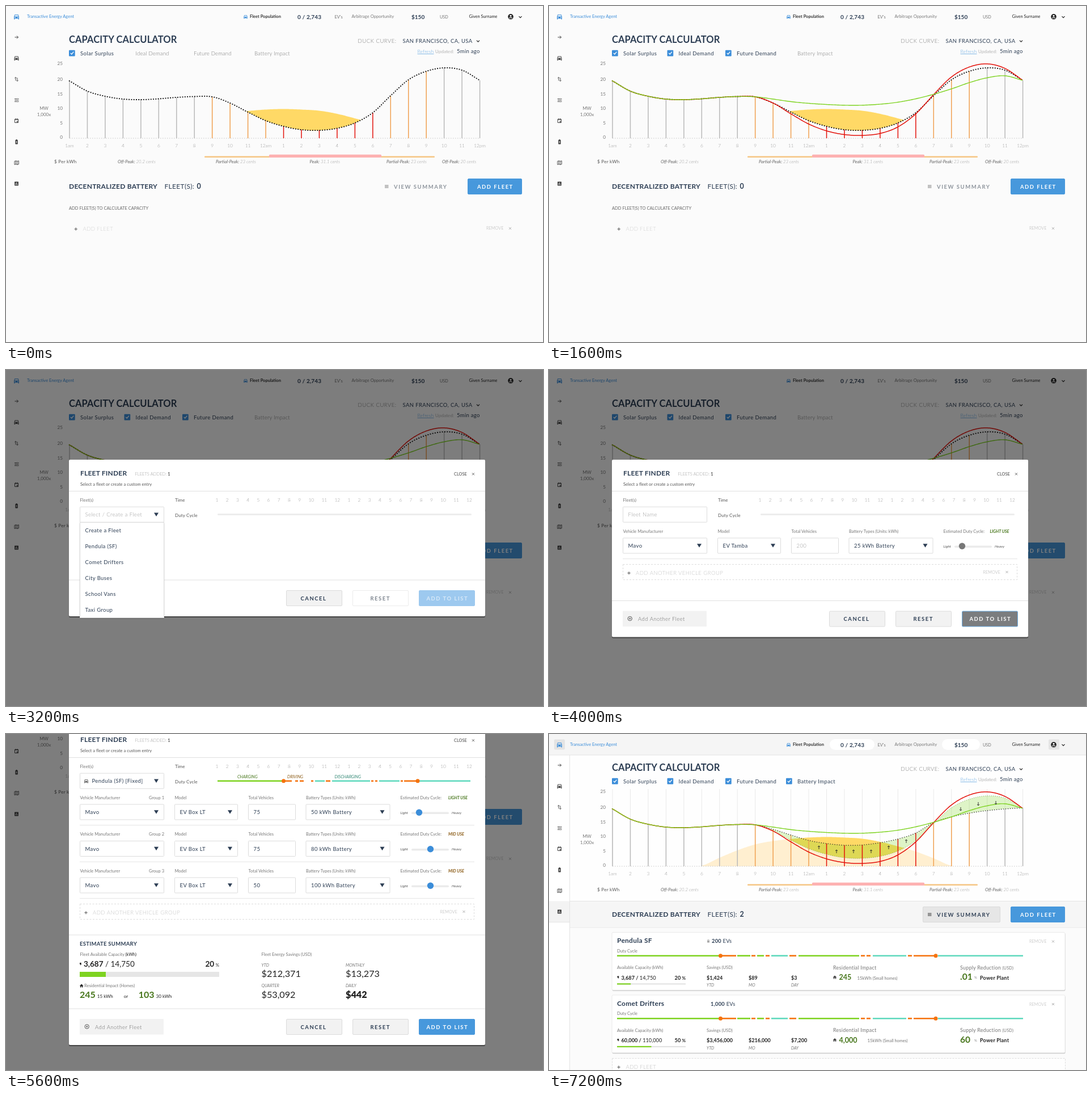
An HTML page for the animation above (8000 ms loop, 947 px wide and 592 px high).

```html
<!DOCTYPE html>
<html lang="en">
<head>
<meta charset="utf-8">
<title>Capacity calculator</title>
<style>
html, body { margin: 0; width: 100%; height: 100%; overflow: hidden; background: #fbfbfb; }
svg { display: block; font-family: Lato, sans-serif; }
text { white-space: pre; }
.l { font-weight: 300; }
.b { font-weight: 700; }
.k { font-weight: 900; }
.i { font-style: italic; }
.m { text-anchor: middle; }
.e { text-anchor: end; }
</style>
</head>
<body>
<svg id="stage" width="947" height="592" viewBox="0 0 947 592"></svg>
<script>
const DARK = '#2d3e54', INK = '#222', GRAY = '#777', PALE = '#a8a8a8', FAINT = '#cfcfcf';
const BLUE = '#4798dc', CHECK = '#3b8dd9', GREEN = '#7ed321', ORANGE = '#f5730f', TEAL = '#5fd9bd';
const RED = '#e3120b', LEAF = '#46751a';
const FRAME = 800, COUNT = 10;

// Drawing helpers, each returns SVG markup
const text = (x, y, s, size = 7.5, fill = GRAY, cls = '', gap = 0) =>
  `<text x="${x}" y="${y}" font-size="${size}" fill="${fill}" class="${cls}" letter-spacing="${gap}">${s}</text>`;
const span = (s, attrs) => `<tspan ${attrs}>${s}</tspan>`;
const rect = (x, y, w, h, fill, more = '') =>
  `<rect x="${x}" y="${y}" width="${w}" height="${h}" fill="${fill}" ${more}/>`;
const line = (x1, y1, x2, y2, stroke, w = 1, more = '') =>
  `<path d="M${x1} ${y1}L${x2} ${y2}" stroke="${stroke}" stroke-width="${w}" ${more}/>`;
const path = (d, stroke, w = 1, more = '') =>
  `<path d="${d}" fill="none" stroke="${stroke}" stroke-width="${w}" ${more}/>`;
const dot = (x, y, r, fill) => `<circle cx="${x}" cy="${y}" r="${r}" fill="${fill}"/>`;
const at = (x, y, s, k = 1) => `<g transform="translate(${x} ${y}) scale(${k})">${s}</g>`;
const range = n => [...Array(n).keys()];

// Icons
const solid = (d, fill) => `<path d="${d}" fill="${fill}" fill-rule="evenodd"/>`;
const car = (x, y, fill, k = 1) => at(x, y, solid(
  'M-4 4V0L-3-3.5H3L4 0V4H2.6V3H-2.6V4ZM-3-.4H3L2.3-2.6H-2.3ZM-3 .7V2H-1.6V.7ZM3 .7V2H1.6V.7Z', fill), k);
const cross = (x, y, c = PALE) => path(`M${x - 2} ${y - 2}l4 4m0-4l-4 4`, c, .9);
const plus = (x, y, c = '#555') => path(`M${x - 2.7} ${y}h5.4m-2.7-2.7v5.4`, c, 1);
const chevron = (x, y) => path(`M${x - 2.5} ${y - 1.3}l2.5 2.5l2.5-2.5`, INK, 1.2);
const triangle = (x, y) => solid(`M${x - 4} ${y - 3}h8l-4 6.5z`, DARK);
const house = (x, y, c = INK) => at(x, y, solid('M-3.3 .3L0-3L3.3 .3H2.3V3H.7V1H-.7V3H-2.3V.3Z', c));
const bolt = (x, y) => solid(`M${x - 1.5} ${y - 2.5}h3l-.7 2h1l-2 3v-2.2h-1.3z`, INK);
const arrow = (x, y, dir) => at(x, y, path(`M0 ${-3 * dir}V${3 * dir}M-2 ${dir}L0 ${3 * dir}L2 ${dir}`, INK, .9));

// Chart curves: one height per hour
const X0 = 112, STEP = 31.46, BASE = 233;
const hourX = i => X0 + STEP * i;
const night = [132, 150, 159, 164, 165, 163.5, 161, 159.5, 160];
const demand = [...night, 171, 187, 202, 212, 218, 219, 215.5, 206, 188, 158, 130, 115, 109, 113, 131];
const ideal = [...night, 164, 168.5, 171.5, 173.5, 174.8, 174.8, 173, 169.5, 163.5, 155.5, 146, 135, 126.5, 123, 131];
const future = [...night, 171, 190, 208, 220, 226.5, 228, 224.5, 213, 190, 156, 125, 107.5, 102, 110, 131];
const relief = [...night, 168, 178, 187.5, 193, 196, 195.5, 191.5, 185, 174.5, 156, 146, 139.5, 135, 132, 130];
const solar = [...Array(5).fill(BASE), 232, 218, 205, 194.5, 188.5, 185, 182.5, 181.5, 182.5, 184.5,
  190, 198, 207, 219, 232, ...Array(4).fill(BASE)];

function valueAt(curve, x) {
  const u = (x - X0) / STEP, i = Math.min(22, Math.max(0, Math.floor(u))), t = u - i;
  const b = curve[i], c = curve[i + 1];
  const a = curve[i - 1] ?? 2 * b - c, d = curve[i + 2] ?? 2 * c - b;
  return b + t / 2 * (c - a + t * (2 * a - 5 * b + 4 * c - d + t * (3 * b - a - 3 * c + d)));
}
const xs = (from, to) => range(Math.floor((to - from) / 2) + 1).map(i => from + 2 * i);
const points = (list, f) => list.map(x => `${x.toFixed(1)} ${f(x).toFixed(2)}`).join('L');
const plot = (curve, stroke, w, more) =>
  path('M' + points(xs(X0 - 1, 836), x => valueAt(curve, x)), stroke, w, more);
function area(top, bottom, from, to, fill) {
  const list = xs(from, to), low = x => valueAt(bottom, x);
  return solid(`M${points(list, x => Math.min(valueAt(top, x), low(x)))}L${points(list.reverse(), low)}Z`, fill);
}

function chart(s) {
  const flat = Array(24).fill(BASE), impact = s.layers > 3;
  let out = '';
  if (s.done) out += range(24).map(i => line(hourX(i), 97, hourX(i), BASE, '#e9e9e9')).join('');
  if (impact) out += area(solar, flat, 269, 711, '#ffefd0');
  out += area(solar, demand, 422, 632, '#ffd966');
  if (impact) out += area(relief, demand, 366, 680, 'rgba(126,211,33,.25)') +
    area(demand, relief, 678, 836, 'rgba(126,211,33,.25)');
  out += line(X0, BASE, 836, BASE, '#c4c4c4', 1, 'stroke-dasharray="1.5 2.5"');
  out += range(24).map(i => {
    const color = i < 8 || i > 20 ? '#b9b9b9' : i > 11 && i < 18 ? RED : '#f0a050';
    return line(hourX(i), (impact ? relief : demand)[i], hourX(i), BASE, color, 1.5);
  }).join('');
  out += impact ? plot(demand, '#6f9a45', 1, 'stroke-dasharray="1 2.5"') + plot(relief, INK, 1.2, 'stroke-dasharray="1.4 2.6"')
    : plot(demand, '#111', 1.8, 'stroke-dasharray="2 2.3"');
  if (s.layers > 2) out += plot(future, RED, 1.5);
  if (s.layers > 1) out += plot(ideal, GREEN, 1.4);
  if (impact) {
    out += [[476, 200], [507, 207], [537, 207], [568, 207], [599, 200], [630, 189]].map(p => arrow(...p, -1)).join('');
    out += [[726, 132], [757, 123], [788, 121]].map(p => arrow(...p, 1)).join('');
  }
  out += [25, 20, 15, 10, 5, 0].map((v, i) =>
    text(100, i ? 106.3 + 25.6 * i : 104, v, 8.2, GRAY, 'e')).join('');
  out += text(67, 183, 'MW', 8, GRAY, 'm') + text(67, 193.5, '1,000x', 8, GRAY, 'm');
  out += range(24).map(i => {
    const hour = i % 12 + 1, suffix = i === 0 || i === 11 ? 'am' : i === 23 ? 'pm' : '';
    return text(hourX(i), 249, hour + suffix, 8.3, '#999', 'm l');
  }).join('');
  const rate = (x, name, cents) =>
    text(x, 276.5, `${name}: ${span(cents + ' cents', 'class="l" fill="#999"')}`, 7.8, '#666', 'i');
  out += text(85, 276.5, '$ Per kWh', 8, '#555', '', .3);
  out += rate(197, 'Off-Peak', 20.2) + rate(370, 'Partial-Peak', 23) + rate(535.5, 'Peak', 31.1) +
    rate(671, 'Partial-Peak', 23) + rate(769, 'Off-Peak', 20);
  return out + rect(350, 264.5, 115, 2.5, '#f6c684', 'rx="1"') + rect(661, 264.5, 95, 2.5, '#f6c684', 'rx="1"') +
    rect(464, 261.8, 198, 5.2, '#fdb1b1', 'rx="1.5"');
}

// Segments are written as colour letter, start and end
const CARD_DUTY = 'g120-302 o302-330 g332-355 o357-364 g367-379 o382-389 t392-421 o424-436 g440-547 ' +
  'o550-557 o560-567 t571-630 o633-640 o643-682 t686-836';
const FINDER_DUTY = 'g373-489 o489-504 o510-515 o518-525 o538-542 t545-562 o564-572 t575-642 ' +
  'o644-648 o651-655 t658-694 o696-700 o702-726 t726-819';
function duty(y, segments, knobs) {
  const colors = { g: GREEN, o: ORANGE, t: TEAL };
  return segments.split(' ').map(s => {
    const [a, b] = s.slice(1).split('-');
    return line(a, y, b, y, colors[s[0]], 2.6);
  }).join('') + knobs.map(x => dot(x, y, 3.5, ORANGE)).join('');
}

const remove = (x, y) => text(x, y, 'REMOVE', 7.3, PALE, 'l', .1) + cross(x + 42, y - 2.5);

function sidebar() {
  const c = '#444';
  return car(18.5, 92, c) +
    path('M15.5 55h6m-2.5-2.5l2.5 2.5l-2.5 2.5', c) +
    path('M17 131.5v-6m-1.7 1.7l1.7-1.7l1.7 1.7M20 126.5v6m-1.7-1.7l1.7 1.7l1.7-1.7', c, .9) +
    path('M15 163.5h4m2 0h1.5M15 166h1.5m2 0h4M15 168.5h4m2 0h1.5M20 162.5v2M17.5 165v2M20 167.5v2', c, .9) +
    path('M15.5 199.5h6v6h-6zM15.5 200h6M17 198v2M20 198v2', c) + rect(18.7, 202.7, 2, 2, c) +
    rect(16.4, 236, 4.4, 7.5, c, 'rx=".7"') + rect(17.6, 235, 2, 1.5, c) + path('M18.6 238v3.5m-1-1.8h2', '#fff', .7) +
    path('M15 273.5l2.4-.7l2.6 .7l2.4-.7v6l-2.4 .7l-2.6-.7l-2.4 .7zM17.4 273v6M20 273.5v6', c, .9) +
    rect(15, 309.5, 7, 7, c, 'rx=".7"') + path('M16.8 315v-2.5m1.8 2.5v-4m1.8 4v-1.5', '#fff', .8);
}

function header(s) {
  let out = '';
  if (s.done) out += rect(0, 0, 947, 37, '#f5f5f5') + rect(0, 37, 36, 555, '#fff') + rect(37, 37, 910, 258, '#fefefe') +
    rect(37, 295, 910, 46, '#f6f6f6') + rect(0, 294.5, 36, 37, '#f3f3f3') +
    line(0, 37, 947, 37, '#e4e4e4') + line(36.5, 37, 36.5, 592, '#e4e4e4') +
    line(37, 294.5, 947, 294.5, '#e4e4e4') + line(37, 341, 947, 341, '#e8e8e8') + line(0, 331.5, 36, 331.5, '#e4e4e4') +
    rect(9, 9.5, 19, 18, '#e4e4e4', 'rx="2"') + rect(881, 9.5, 19, 18, '#e4e4e4', 'rx="2"') +
    rect(495, 9, 79, 19, '#fff', 'rx="9.5"') + rect(693, 9, 67, 19, '#fff', 'rx="9.5"');
  return out + car(18.5, 19, CHECK, 1.1) + text(37, 21.3, 'Transactive Energy Agent', 7.5, CHECK) +
    car(422.5, 19, CHECK, .8) + text(430, 21.3, 'Fleet Population', 7.5, '#333', 'b') +
    text(514, 22.5, '0 / 2,743', 10, DARK, 'b', .15) + text(579.5, 21.5, "EV's") +
    text(609.5, 21.3, 'Arbitrage Opportunity', 7.5, GRAY, '', .06) + text(715, 22.5, '$150', 10, DARK, 'b') +
    text(765, 21.5, 'USD', 7.3) + text(816.5, 21.3, 'Given Surname', 7.5, INK) +
    dot(890, 18.8, 4.8, INK) + dot(890, 17.3, 1.6, '#fff') + path('M887.3 21.4q2.7-2 5.4 0', '#fff', 1.3) + chevron(907, 19.5);
}

function button(x, y, w, label, labelX, fill, border, color) {
  return rect(x + .5, y + .5, w - 1, 27, fill, `stroke="${border}" rx="1.5"`) +
    text(labelX, y + 17.7, label, 9.5, color, 'b', 1.5);
}

function card(y, fleet) {
  const o = y - 349, put = (x, base, ...rest) => text(x, base + o, ...rest);
  return rect(111.5, y + 1.8, 799, 102, '#c9c9c9', 'rx="2"') + rect(111, y + .5, 799, 101.7, '#fff', 'rx="2" stroke="#e6e6e6" stroke-width=".8"') +
    put(120, 368, fleet.name, 12, DARK, 'b', .25) +
    (fleet.locked ? rect(279, 364 + o, 4, 3.5, PALE) + path(`M279.8 ${364 + o}v-1.5h2.4v1.5`, PALE, .8) : '') +
    put(fleet.locked ? 287 : 285, 368, `${span(fleet.size, 'class="b"')} EVs`, 9.3, DARK, '', .25) + remove(847, 368 + o) +
    put(120, 384.5, 'Duty Cycle') + duty(390.7 + o, CARD_DUTY, [302.5, 682]) +
    put(120, 414, 'Available Capacity (kWh)') + bolt(122, 429 + o) +
    put(127.5, 432.5, `${span(fleet.used + ' /', 'class="b"')} ${fleet.total}`, 9.2, INK) +
    put(241, 432.5, `${fleet.percent} ${span('%', 'font-size="8"')}`, 9.2, INK, 'b e') +
    rect(120, 439.3 + o, 121, 2.2, '#e3e3e3') + rect(120, 439.3 + o, 1.21 * fleet.percent, 2.2, GREEN) +
    put(278, 414, 'Savings (USD)') +
    ['YTD', 'MO', 'DAY'].map((unit, i) => {
      const x = [278, 352, 427][i];
      return put(x, 432.5, fleet.savings[i], 9, INK, 'b') + put(x, 445, unit, 7.2, GRAY, 'i');
    }).join('') +
    put(501, 414.5, 'Residential Impact', 9, GRAY, '', .25) + house(504, 428.5 + o, '#444') +
    put(511.5, 433, fleet.homes, 12.5, LEAF, 'b') +
    put(fleet.locked ? 543.5 : 561.5, 432.5, '15kWh ' + span('(Small homes)', 'font-size="7.3"'), 7.8) +
    put(725, 414.5, 'Supply Reduction ' + span('(USD)', 'font-size="7.3"'), 9, GRAY, '', .2) +
    put(725, 433, fleet.supply, 15.5, LEAF, 'b') + put(750, 431, '%', 6) + put(760, 432.5, 'Power Plant', 9, INK, 'b', .25);
}

const FLEETS = [
  { name: 'Pendula SF', locked: true, size: '200', used: '3,687', total: '14,750', percent: 20,
    savings: ['$1,424', '$89', '$3'], homes: '245', supply: '.01' },
  { name: 'Comet Drifters', size: '1,000', used: '60,000', total: '110,000', percent: 50,
    savings: ['$3,456,000', '$216,000', '$7,200'], homes: '4,000', supply: '60' },
];

function page(s) {
  let out = header(s) + sidebar();
  out += text(111, 65, 'CAPACITY CALCULATOR', 16.5, DARK, 'b', .1);
  out += text(620.5, 65, 'DUCK CURVE:', 9.5, GRAY, 'l', .55) +
    text(699.5, 65, 'SAN FRANCISCO, CA, USA', 9.5, DARK, '', .4) + chevron(832.5, 62) +
    text(725.5, 83, 'Refresh', 8.5, '#5aa2e0', 'l', .15) + line(725.5, 84.5, 754.5, 84.5, '#5aa2e0', .7) +
    text(757, 83, 'Updated:', 8, GRAY, 'l', .2) + text(795, 83, '5min ago', 9.5, DARK, '', .28);
  ['Solar Surplus', 'Ideal Demand', 'Future Demand', 'Battery Impact'].forEach((label, i) => {
    const x = [131, 228.5, 331, 438][i], on = i < s.layers;
    if (on) out += rect(x - 20, 77.7, 10.7, 10.7, CHECK, 'rx="1"') + path(`M${x - 17.2} 83l2 2l3.5-4.3`, '#fff', 1.3);
    out += text(x, 87, label, 9.5, on ? DARK : GRAY, on ? '' : 'l', on ? .4 : .2);
  });
  out += chart(s);
  out += text(111, 322.3, 'DECENTRALIZED BATTERY', 12, DARK, 'b', .25) +
    text(279.5, 322.3, 'FLEET(S):', 12, DARK, '', .3) + text(336.5, 322.3, s.done ? 2 : 0, 12.5, DARK, 'b');
  if (s.done) out += rect(659.5, 304.5, 136, 27, '#e6e6e6', 'stroke="#d9d9d9" rx="1.5"');
  out += path('M668 316h6.5m-6.5 2h6.5m-6.5 2h6.5', s.done ? '#444' : '#888', 1) +
    text(684, 321.7, 'VIEW SUMMARY', 9.5, s.done ? DARK : '#8d949c', 'b', 1.55) +
    button(814, 304, 96, 'ADD FLEET', 831, BLUE, BLUE, '#fff');
  if (s.done) return out + card(349, FLEETS[0]) + card(459.5, FLEETS[1]) +
    rect(111.5, 571.5, 799, 40, '#fefefe', 'stroke="#ddd" stroke-dasharray="3 2"') +
    plus(123, 587) + text(135.5, 590, 'ADD FLEET', 9.5, '#bdbdbd', 'l', .4);
  return out + text(111, 359.2, 'ADD FLEET(S) TO CALCULATE CAPACITY', 7.5, '#666') +
    plus(123.2, 393) + text(135.5, 396, 'ADD FLEET', 9.5, FAINT, 'l', .4) + remove(847, 394.3);
}

function field(x, y, w, value, dropdown, hint) {
  return rect(x + .5, y + .5, w - 1, 27, '#fff', 'stroke="#dcdcdc" rx="1"') +
    text(x + 9.5, y + 17.7, value, 9.5, hint ? '#999' : DARK, hint ? 'l' : '', .4) +
    (dropdown ? triangle(x + w - 14, y + 13.7) : '');
}

function vehicleGroup(g, i, named) {
  const y = 286.5 + 64.5 * i, box = y + 9;
  return text(130.5, y, 'Vehicle Manufacturer') + (named ? text(279, y, 'Group ' + (i + 1), 7.5, GRAY, 'e') : '') +
    text(297.5, y, 'Model') + text(427.5, y, 'Total Vehicles') + text(529, y, 'Battery Types (Units: kWh)') +
    text(695.5, y, 'Estimated Duty Cycle:') +
    text(named === 'late' ? 780 : 777.5, y, g.level, 7.3, g.level[0] === 'L' ? LEAF : named === 'late' ? '#8a5a14' : '#c9781c', 'b i') +
    field(130, box, 149, g.maker, true) + field(297, box, 112, g.model, true) +
    field(427, box, 84, g.total, false, !named) + field(528.5, box, 149, g.battery + ' kWh Battery', true) +
    text(695.5, y + 26, 'Light', 6.5, '#555', 'i') + text(786, y + 26, 'Heavy', 6.5, '#555', 'i') +
    rect(715, y + 23, 66, 3.5, '#ebebeb', 'rx="1.7"') +
    dot(g.level[0] === 'L' ? 728.5 : 748.5, y + 23.7, 5.7, named ? CHECK : '#777') +
    line(130, y + 46.2, 826, y + 46.2, '#e4e4e4');
}

function summary(y, d) {
  const money = (x, dy, label, value, cls) =>
    text(x, y + dy, label, 7.3, GRAY, 'i') + text(x, y + dy + 18.3, value, 16.2, INK, cls);
  const small = (s, dx) => span(s, `dx="${dx}" font-size="8" font-weight="400" fill="${INK}"`);
  return line(111, y, 845, y, '#e0e0e0') + text(130, y + 18.7, 'ESTIMATE SUMMARY', 9.5, DARK, 'b', .3) +
    text(130.5, y + 37.3, 'Fleet Available Capacity ' + span('(kWh)', `fill="${INK}"`)) + bolt(131.5, y + 51.5) +
    text(137, y + 56, `${span(d.used, 'class="b"')} / ${d.total}`, 13.5, INK) +
    text(376, y + 56, d.percent + span('%', 'dx="2.5" font-size="8" font-weight="400"'), 13.5, INK, 'b e') +
    rect(130, y + 65, 246, 9, '#e6e6e6') + rect(130, y + 65, d.width, 9, d.fill) +
    house(133.2, y + 89.5) + text(138, y + 92, 'Residential Impact (Homes)') +
    text(130, y + 111, d.homes[0] + small('15 kWh', 3) + small('or', 19) + span(d.homes[1], 'dx="18.5"') + small('30 kWh', 3), 16, LEAF, 'b') +
    text(450.5, y + 37.3, 'Fleet Energy Savings (USD)') +
    money(450.5, 55.5, 'YTD', d.money[0], '') + money(599, 55.5, 'MONTHLY', d.money[1], '') +
    money(450.5, 92.3, 'QUARTER', d.money[2], '') + money(599, 92.3, 'DAILY', d.money[3], 'k');
}

function finder(m) {
  const groups = m.groups || [], foot = m.bottom - 46;
  let out = rect(111, 160, 734, m.bottom - 158, '#000', 'opacity=".45" rx="2"') + rect(111, 158, 734, m.bottom - 158, '#fff', 'rx="2"');
  out += text(131, 185.8, 'FLEET FINDER', 12, DARK, 'b', .2) +
    text(227.5, 185.5, 'FLEETS ADDED: ' + span('1', `fill="${INK}" font-weight="400"`), 7.5, '#999', 'l', .05) +
    text(790, 185.7, 'CLOSE', 7.4, '#444') + cross(824, 183.3, '#555') +
    text(131, 204, 'Select a fleet or create a custom entry', 7.5, '#555', '', .04) + line(111, 213.5, 845, 213.5, '#e0e0e0');
  out += text(130.5, 231.5, 'Fleet(s)') + text(298, 231.7, 'Time', 8, '#555') + text(298, 259, 'Duty Cycle', 8, '#555', '', .15);
  let x = 369.6;
  for (const i of range(24)) {
    const hour = i % 12 + 1, w = hour > 9 ? 9.6 : 4.8;
    out += text(x + w / 2, 231.7, hour, 8.3, '#999', 'm l');
    x += w + 13.4;
  }
  out += m.duty ? duty(254.8, FINDER_DUTY, [489.5, 726]) + text(408, 250, 'CHARGING', 7.3, LEAF, 'i') +
    text(496, 250, 'DRIVING', 7.3, '#8a5a14', 'i') + text(579.5, 250, 'DISCHARGING', 7.3, '#2f8672', 'i')
    : rect(373, 253, 448, 3, '#ededed', 'rx="1.5"');
  out += field(130, 240.7, 149, m.icon ? '' : m.fleet, m.select, m.hint);
  if (m.icon) out += car(141.5, 255, '#555', .85) + text(151.5, 258.4, m.fleet, 9.5, DARK, '', .4);
  out += groups.map((g, i) => vehicleGroup(g, i, m.named)).join('');
  if (groups.length) {
    const y = 342.5 + 64.5 * (groups.length - 1);
    out += rect(130.5, y, 695, 27, 'none', 'stroke="#dcdcdc" stroke-dasharray="3 2.5"') + plus(141, y + 15.3) +
      text(153, y + 18, 'ADD ANOTHER VEHICLE GROUP', 9.5, '#c2c2c2', 'l', .45) + remove(765.5, y + 16);
    out += rect(130, foot, 148, 27.5, '#f2f2f2', 'rx="1"') + `<circle cx="142.7" cy="${foot + 13.5}" r="3.7" fill="none" stroke="#555"/>` +
      path(`M140.9 ${foot + 13.5}h3.6m-1.8-1.8v3.6`, '#555', .9) + text(157, foot + 17.7, 'Add Another Fleet', 9.5, '#666', 'l', .45);
  }
  if (m.summary) out += summary(m.bottom - 194, m.summary);
  const ready = groups.length > 0, [fill, border, ink] = m.submit;
  out += line(111, m.bottom - 64, 845, m.bottom - 64, '#e0e0e0') +
    button(494, foot, 99, 'CANCEL', 519.5, '#f2f2f2', '#dcdcdc', DARK) +
    button(611, foot, 99, 'RESET', 642.5, ready ? '#f2f2f2' : '#fff', ready ? '#dcdcdc' : '#ececec', ready ? DARK : '#7f8790') +
    button(728, foot, 99, 'ADD TO LIST', 741.5, fill, border, ink);
  if (m.list) {
    out += rect(129.5, 269, 150, 169.5, '#000', 'opacity=".12" rx="2"') + rect(130.5, 268.5, 148, 168, '#fff', 'stroke="#dcdcdc"');
    out += m.list.map((name, i) => text(139.5, 286 + 28 * i, name, 9.5, DARK, '', .4)).join('');
  }
  return out;
}

const van = (total, battery, level) => ({ maker: 'Mavo', model: 'EV Box LT', total, battery, level });
const READY = [BLUE, BLUE, '#fff'];
const EMPTY = { fleet: 'Select / Create a Fleet', select: true, hint: true, bottom: 434, submit: ['#9dc9ef', '#9dc9ef', '#d8e9f8'] };
const LISTED = { ...EMPTY, list: ['Create a Fleet', 'Pendula (SF)', 'Comet Drifters', 'City Buses', 'School Vans', 'Taxi Group'] };
const CUSTOM = { fleet: 'Fleet Name', hint: true, bottom: 470.5, submit: ['#7b7d7f', '#6fb0e8', '#fff'],
  groups: [{ maker: 'Mavo', model: 'EV Tamba', total: '200', battery: 25, level: 'LIGHT USE' }] };
const TRUCKS = { fleet: 'Comet Drifters', bottom: 637, submit: READY, named: 'early',
  groups: [{ maker: 'Lunor', model: 'Hauler (Truck)', total: '1,000', battery: 110, level: 'MID LEVEL' }],
  summary: { used: '60,000', total: '110,000', percent: 50, width: 123, fill: '#777', homes: ['4,000', '2,000'],
    money: ['$3,456,000', '$216,000', '$864,000', '$7,200'] } };
const VANS = { fleet: 'Pendula (SF) [Fixed]', icon: true, select: true, duty: true, bottom: 720, submit: READY, named: 'late',
  groups: [van(75, 50, 'LIGHT USE'), van(75, 80, 'MID USE'), van(50, 100, 'MID USE')],
  summary: { used: '3,687', total: '14,750', percent: 20, width: 46, fill: GREEN, homes: ['245', '103'],
    money: ['$212,371', '$13,273', '$53,092', '$442'] } };

const STATES = [
  { layers: 1 }, { layers: 2 }, { layers: 3 },
  { layers: 3, modal: EMPTY }, { layers: 3, modal: LISTED }, { layers: 3, modal: CUSTOM },
  { layers: 3, modal: TRUCKS, scroll: 96 }, { layers: 3, modal: VANS, scroll: 172 },
  { layers: 3, done: true }, { layers: 4, done: true },
];

const stage = document.getElementById('stage');
let shown = -1;
function render(state) {
  const up = -(state.scroll || 0);
  stage.innerHTML = rect(0, 0, 947, 592, '#fbfbfb') + at(0, up, page(state)) +
    (state.modal ? rect(0, 0, 947, 592, '#000', 'opacity=".5"') + at(0, up, finder(state.modal)) : '');
}
function tick() {
  const index = Math.floor(performance.now() / FRAME) % COUNT;
  if (index !== shown) render(STATES[shown = index]);
  requestAnimationFrame(tick);
}
tick();
</script>
</body>
</html>
```
